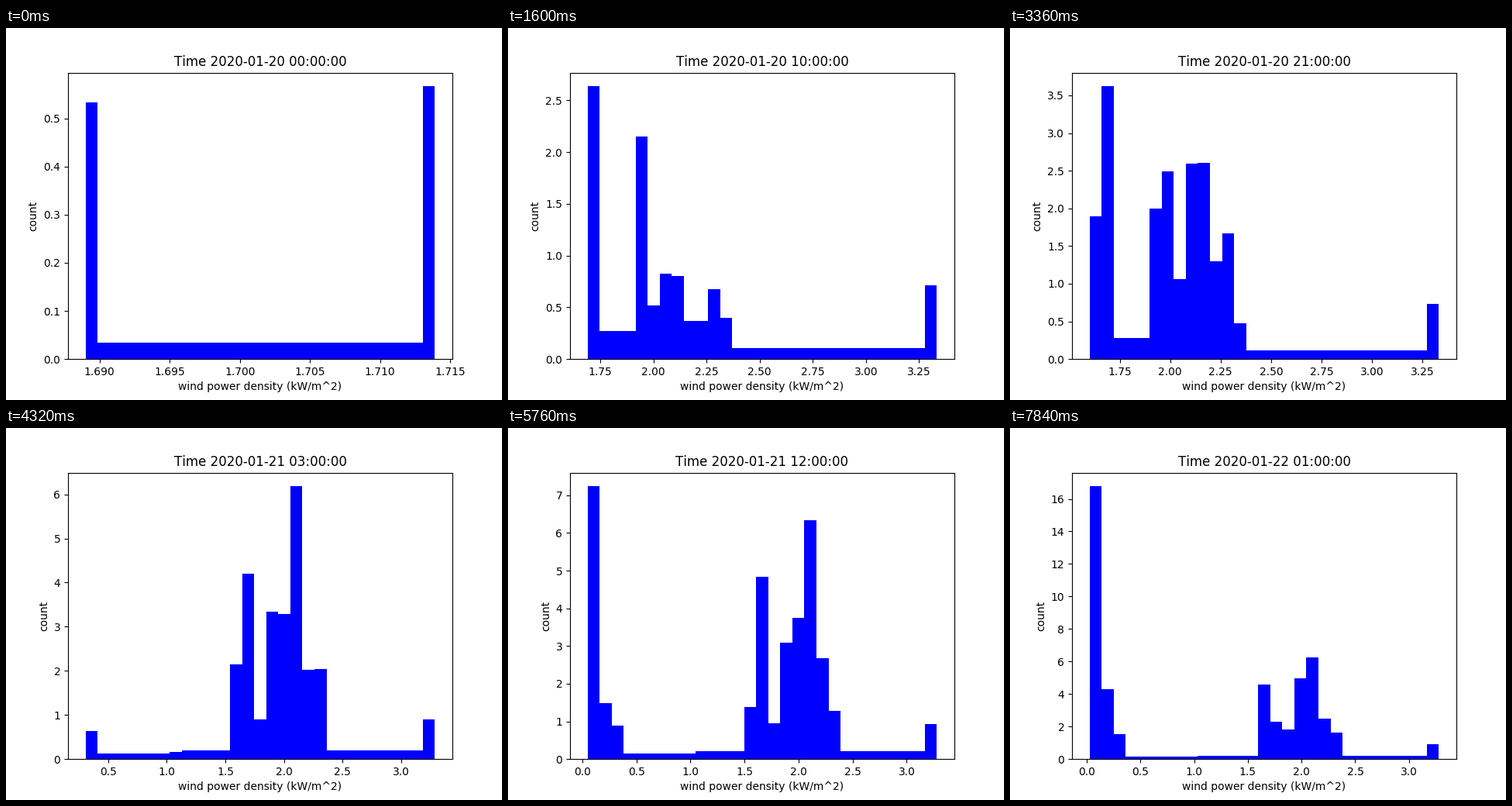
A matplotlib script for the animation above (8 s loop, 640 by 480 pixels).

```python
import matplotlib.pyplot as plt
import numpy as np
from matplotlib.animation import FuncAnimation

FRAMES = 50
STEP_MS = 160
BINS = 30

# Wind power density in kW/m^2: legs of (end value, hours, curve exponent)
START = 1.689
LEGS = [
    (1.717, 2, 0.12), (2.26, 3, 0.83), (2.3415, 1, 1), (3.3914, 2, 1),  # rise
    (2.0715, 1, 1), (1.927, 2, 0.4), (1.6, 3, 0.33),                    # drop
    (1.9886, 2, 0.05), (2.2805, 4, 0.79), (2.1372, 2, 0.135),           # swell
    (2.0756, 1, 1), (1.835, 2, 0.84), (0.306, 3, 1.7),                  # collapse
    (0.172, 2, 1.54), (0.025, 10, 0.45), (0.236, 10, 2),                # lull
]


def hourly_density():
    values = [START]
    for end, hours, power in LEGS:
        t = np.arange(1, hours + 1) / hours
        values.extend(values[-1] + (end - values[-1]) * t ** power)
    return np.array(values)


def histogram(values):
    """Bin the interpolated empirical distribution; the top two bins merge."""
    ranked = np.sort(values)
    n = len(ranked)
    edges = np.linspace(ranked[0], ranked[-1], BINS + 1)[:-1]
    below = np.interp(edges, ranked, np.arange(n) + 0.5)
    below[0], below[-1] = 0, n
    return edges, np.diff(below)


plt.rcParams["text.kerning_factor"] = 6
density = hourly_density()
fig, ax = plt.subplots(figsize=(6.4, 4.8), dpi=100)


def draw(hour):
    ax.clear()
    edges, counts = histogram(density[:hour + 2])
    ax.bar(edges[:-1], counts, width=np.diff(edges), align="edge", color="blue")
    day, clock = divmod(hour, 24)
    ax.set_title(f"Time 2020-01-{20 + day} {clock:02d}:00:00")
    ax.set_xlabel("wind power density (kW/m^2)")
    ax.set_ylabel("count")
    return ax.patches


anim = FuncAnimation(fig, draw, frames=FRAMES, init_func=lambda: draw(0),
                     interval=STEP_MS, repeat=True, repeat_delay=0)
plt.show()
```
